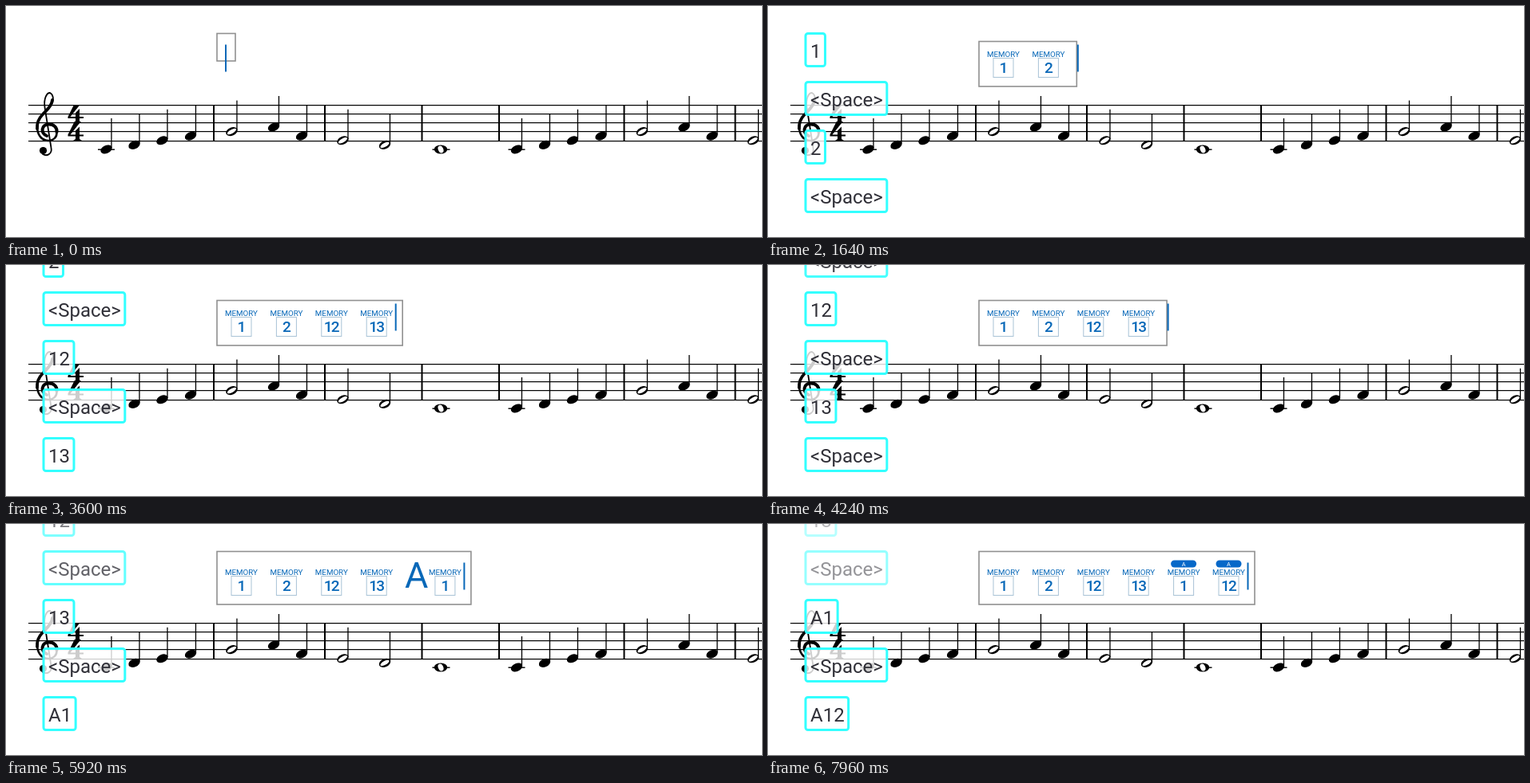
An HTML page with a canvas for the animation above (8 s loop, 946 by 290 pixels).

```html
<!DOCTYPE html>
<html lang="en">
<head>
<meta charset="utf-8">
<title>Memory keys over a score</title>
<style>
html, body { margin: 0; width: 100%; height: 100%; overflow: hidden; background: #fff; }
canvas { display: block; }
</style>
</head>
<body>
<canvas id="stage" width="946" height="290"></canvas>
<script>
const ctx = document.getElementById('stage').getContext('2d');
const LOOP = 8000;
const BLUE = '#0868b8';

// Key presses: [time in ms, key]
const KEYS = [
  [40, '1'], [440, ' '], [800, '2'], [1200, ' '],
  [1840, '1'], [2240, '2'], [2560, ' '],
  [3200, '1'], [3600, '3'], [4000, ' '],
  [5200, 'A'], [5840, '1'], [6280, ' '],
  [6760, 'A'], [7240, '1'], [7640, '2']
];

function text(str, x, y, font, color, align = 'left', spacing = 0) {
  ctx.font = font + ' Roboto, sans-serif';
  ctx.letterSpacing = spacing + 'px';
  ctx.textAlign = align;
  ctx.fillStyle = color;
  ctx.fillText(str, x, y);
}

function roundRect(x, y, w, h, r) {
  ctx.beginPath();
  ctx.roundRect(x, y, w, h, r);
}

function stroke(path, width) {
  ctx.lineWidth = width;
  ctx.stroke(new Path2D(path));
}

function ellipse(x, y, rx, ry, angle) {
  ctx.beginPath();
  ctx.ellipse(x, y, rx, ry, angle, 0, 7);
  ctx.fill();
}

// --- Score ---

// Staff height of a pitch counted in steps above middle C
const pitchY = step => 180 - step * 5.6;

function note(x, step, half) {
  const y = pitchY(step);
  ctx.fillStyle = '#000';
  ellipse(x, y, 7.6, 5, -0.42);
  if (half) {
    ctx.fillStyle = '#fff';
    ellipse(x, y, 6.3, 2.4, -0.52);
  }
  ctx.fillStyle = '#000';
  ctx.fillRect(x + 5.8, y - 39, 1.3, 37);
  if (step === 0) ctx.fillRect(x - 10.5, 179.5, 21, 1.4);
}

function phrase(dx) {
  const notes = [
    [125.5, 0], [160.5, 1], [195.5, 2], [231, 3],
    [282.5, 4, true], [335, 5], [370, 3],
    [421.5, 2, true], [474, 1, true]
  ];
  for (const [x, step, half] of notes) note(x + dx, step, half);
  ctx.fillStyle = '#000';
  for (const x of [260, 399, 520.5, 617]) ctx.fillRect(x + dx - 1, 124, 2, 46);
  ctx.fillRect(533.5 + dx, 179.5, 22, 1.4);
  ellipse(544 + dx, 180, 8.2, 5.6, 0);
  ctx.fillStyle = '#fff';
  ellipse(544 + dx, 180, 3.2, 4.6, -0.4);
}

function clef() {
  ctx.strokeStyle = ctx.fillStyle = '#000';
  ctx.lineCap = 'round';
  stroke('M46 186C51 189 58 186 56.5 178L48.5 127C47 116 51 109 55 109C59 111 60 117 58 122', 1.8);
  stroke('M58 118C57 127 50 131 46 136C41 141 38.5 147 39 154', 3.8);
  stroke('M39 153C40 165 47 169 53 169C60 169 64 164 63.5 158', 2.6);
  stroke('M51 163C43 160 44 149 53 148.5C60 148 64 153 63.5 158', 4);
  ellipse(46.5, 181.5, 4.6, 4.6, 0);
}

function score() {
  ctx.fillStyle = '#000';
  for (const y of [124, 135, 146, 157, 169]) ctx.fillRect(28, y, 918, 1.2);
  clef();
  const four = new Path2D('M85 124h7.5L80.5 139h6.5v-5l5-5v10h5v2h-5v3.5l3 2h-11l3-2v-3.5h-9.5v-2z');
  ctx.fill(four);
  ctx.translate(0, 22.5);
  ctx.fill(four);
  ctx.translate(0, -22.5);
  phrase(0);
  phrase(513.5);
}

// --- Text field ---

const MEMORY_WIDTH = 43.5, LETTER_WIDTH = 29.3, SPACE_WIDTH = 12.9;

function memory(x, number, prefix) {
  const mid = x + 21;
  if (prefix) {
    ctx.fillStyle = '#0668c8';
    roundRect(mid - 16, 45.5, 32, 9, 4.5);
    ctx.fill();
    text(prefix, mid, 53, '7.5px', '#fff', 'center');
  }
  text('MEMORY', mid, 64, '9.75px', BLUE, 'center');
  ctx.strokeStyle = '#a9c3d6';
  ctx.lineWidth = 1;
  ctx.strokeRect(mid - 12.5, 65.5, 25, 24);
  text(number, mid - 0.5, 84, '500 19px', BLUE, 'center', -1.8);
}

function field(typed, sinceKey) {
  const words = typed.split(' ');
  const parts = [];
  let x = 273.5, trimmed = x;
  words.forEach((word, i) => {
    if (i) x += SPACE_WIDTH;
    if (!word) return;
    const lettered = word[0] === 'A';
    const number = lettered ? word.slice(1) : word;
    // The letter joins its number as a badge shortly after typing
    const joined = lettered && number && (i < words.length - 1 || sinceKey > 110);
    if (lettered && !joined) {
      const at = x;
      parts.push(() => text('A', at, 80, '45px', BLUE));
      x += LETTER_WIDTH;
    }
    if (number) {
      const at = x;
      parts.push(() => memory(at, number, joined ? 'A' : ''));
      x += MEMORY_WIDTH;
    }
    trimmed = x;
  });

  const right = Math.max(287, trimmed + 10, x);
  const top = !typed || typed.includes('A') ? 34.5 : 44.5;
  const bottom = typed ? 101 : 69;
  ctx.fillStyle = '#fff';
  ctx.fillRect(264, top, right - 264, bottom - top);
  ctx.strokeStyle = '#909090';
  ctx.lineWidth = 1.6;
  ctx.strokeRect(264, top, right - 264, bottom - top);
  parts.forEach(draw => draw());
  ctx.fillStyle = BLUE;
  ctx.fillRect(x + 0.5, 48.5, 2, 34);
}

// --- Key press overlay ---

function keyStack(pressed, t) {
  const items = [];
  let last;
  for (const [time, key] of pressed) {
    if (key === ' ' || !last || last.label === '<Space>') {
      last = { label: '' };
      items.push(last);
    }
    last.label += key === ' ' ? '<Space>' : key;
    last.time = time;
  }
  items.reverse().slice(0, 5).forEach(({ label, time }, i) => {
    const y = 217.5 - i * 61;
    ctx.globalAlpha = Math.max(0, Math.min(1, 1 - (t - time - 2800) / 2400));
    ctx.font = '24px Roboto, sans-serif';
    ctx.letterSpacing = '0px';
    const width = ctx.measureText(label).width + 11;
    roundRect(47, y, width, 41, 3);
    ctx.fillStyle = 'rgba(255,255,255,.8)';
    ctx.fill();
    ctx.strokeStyle = '#3ff';
    ctx.lineWidth = 3;
    ctx.stroke();
    text(label, 53, y + 30, '24px', '#303038');
  });
  ctx.globalAlpha = 1;
}

function frame() {
  const t = performance.now() % LOOP;
  const pressed = KEYS.filter(([time]) => time <= t);
  const sinceKey = pressed.length ? t - pressed[pressed.length - 1][0] : 0;
  ctx.fillStyle = '#fff';
  ctx.fillRect(0, 0, 946, 290);
  score();
  field(pressed.map(([, key]) => key).join(''), sinceKey);
  keyStack(pressed, t);
  requestAnimationFrame(frame);
}
frame();
</script>
</body>
</html>
```
